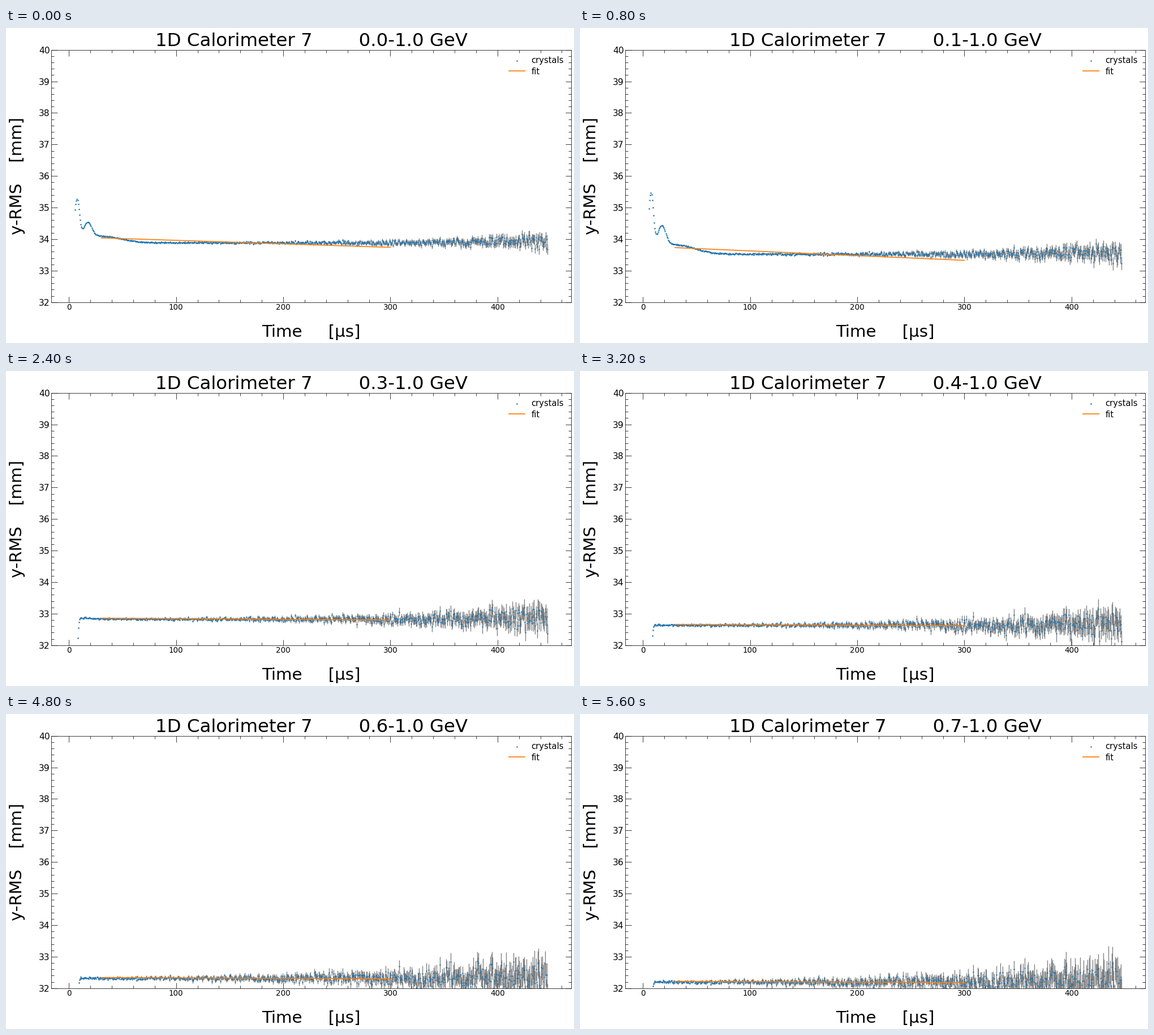
A matplotlib script that plays this animation: 1004 px wide and 558 px high, repeating every 6.4 s.

```python
import numpy as np
import matplotlib.pyplot as plt
from matplotlib.animation import FuncAnimation
from matplotlib.lines import Line2D
from matplotlib.ticker import MultipleLocator

W, H, DPI = 1004, 558, 64
PX = 72 / DPI                      # points per pixel
BLUE, ORANGE, GRAY = "#1f77b4", "#ff7f0e", "gray"
STEPS = 8

plt.rcParams["font.family"] = "DejaVu Sans"
fig = plt.figure(figsize=(W / DPI, H / DPI), dpi=DPI, facecolor="white")

# Edges sit just off the half pixel so that they snap to the intended row or column
LEFT, RIGHT, TOP, BOTTOM = 80.3, 999.3, 38.7, 485.8
ax = fig.add_axes([LEFT / W, 1 - BOTTOM / H, (RIGHT - LEFT) / W, (BOTTOM - TOP) / H])
ax.set(xlim=(-16.4, 468.9), ylim=(32, 40))


def label(x, y, text, size, **kw):
    return fig.text(x / W, 1 - y / H, text, fontsize=size * PX, va="baseline", **kw)


def legend_line(xs, y, **kw):
    fig.add_artist(Line2D(np.array(xs) / W, [1 - y / H] * len(xs), **kw))


# Axes furniture
for axis, major, minor in ((ax.xaxis, 100, 20), (ax.yaxis, 1, 0.2)):
    axis.set_major_locator(MultipleLocator(major))
    axis.set_minor_locator(MultipleLocator(minor))
ax.tick_params(which="both", direction="in", top=True, right=True, width=0.75 * PX)
ax.tick_params(which="major", length=10.5 * PX)
ax.tick_params(which="minor", length=5.3 * PX)
ax.tick_params(axis="x", labelsize=13.5 * PX, pad=1.8 * PX)
ax.tick_params(axis="y", labelsize=15.5 * PX, pad=2.8 * PX)
for spine in ax.spines.values():
    spine.set_linewidth(0.75 * PX)

title = label(539.8, 32, "", 32.38, ha="center")
label(539, 547, "Time" + " " * 5 + "[μs]", 29.3, ha="center")
label(27.5, 366.5, "y-RMS" + " " * 4 + "[mm]", 29.3, rotation=90, rotation_mode="anchor")

DOT = dict(marker="o", ms=2.5 * PX, mew=0, ls="none", color=BLUE)
FIT = dict(color=ORANGE, lw=1.75 * PX)
legend_line([903.3], 57.5, **DOT)
legend_line([889, 917], 76, **FIT)
label(928.4, 62, "crystals", 14.7)
label(928.4, 82, "fit", 14.7)

# Data model: a level per threshold, with early swings that fade as it rises
t = np.arange(5.6, 447, 0.6)
LEVELS = [33.89, 33.53, 33.1, 32.83, 32.64, 32.46, 32.32, 32.2]


def bump(center, width):
    return np.exp(-((t - center) / width) ** 2)


def swing(k):
    return np.exp(0.97 * k - 0.635 * k ** 2)


def mean_curve(k):
    shoulder = 0.23 / (1 + np.exp((t - 50) / 8))
    swings = 1.15 * bump(7.4, 3) + 0.43 * bump(17.5, 5) + shoulder
    dip = np.clip(1.8 * (k - 1), 0, 3.2) * bump(5, 2.4)
    return LEVELS[k] + swing(k) * swings - dip + 0.06 * (t / 447) ** 6


def fit_ends(k):
    half_drop = 0.02 + 0.13 * swing(k)
    return LEVELS[k] + half_drop, LEVELS[k] - half_drop


def build_series():
    """Scatter grows as counts decay and stays correlated between thresholds."""
    rng = np.random.default_rng(7)
    z = rng.normal(size=t.size)
    series = []
    for k in range(STEPS):
        z = 0.87 * z + 0.49 * rng.normal(size=t.size)
        wiggle = 1 + (0.12 + 0.05 * k) * np.cos(2 * np.pi * t / 4.365)
        error = (0.155 + 0.043 * k) * np.exp((t - 447) / 150) / np.sqrt(wiggle)
        series.append((mean_curve(k) + 0.75 * error * np.clip(z, -2.3, 2.3), error))
    return series


SERIES = build_series()
bars = ax.vlines(t, 32, 32, color=GRAY, lw=1.35 * PX, zorder=2)
dots, = ax.plot(t, t, zorder=2.1, **DOT)
fit, = ax.plot([30, 300], [34, 34], zorder=2.2, **FIT)


def draw(k):
    y, error = SERIES[k]
    low, high = np.column_stack([t, y - error]), np.column_stack([t, y + error])
    bars.set_segments(np.stack([low, high], axis=1))
    dots.set_ydata(y)
    fit.set_ydata(fit_ends(k))
    title.set_text("1D Calorimeter 7" + " " * 8 + f"{k / 10:.1f}-1.0 GeV")
    return bars, dots, fit, title


anim = FuncAnimation(fig, draw, frames=STEPS, interval=800, repeat=True, repeat_delay=0)
plt.show()
```
